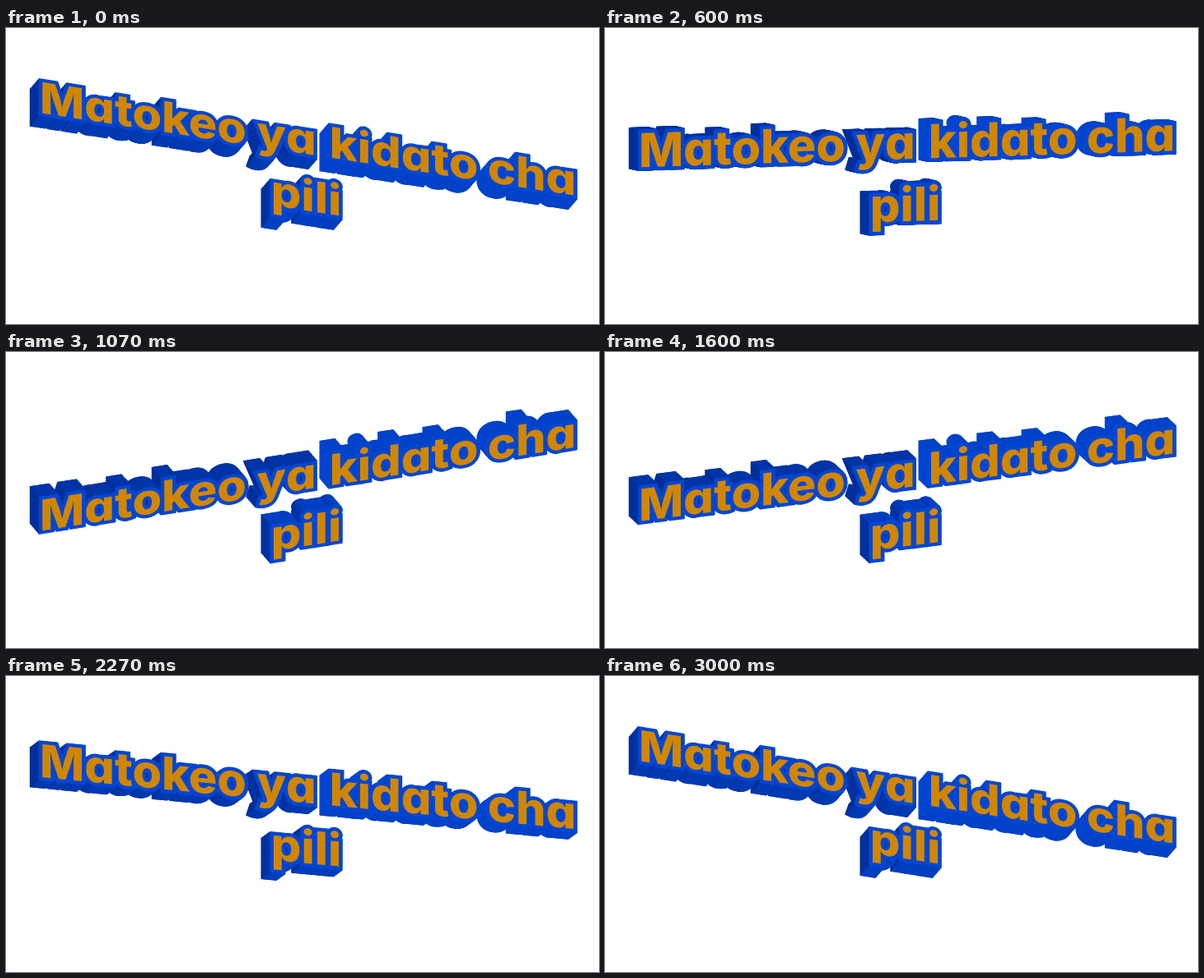
These frames come from a looping animation (720x360 px, 3070 ms). An HTML page with a canvas:

```html
<!DOCTYPE html>
<html lang="sw">
<head>
<meta charset="utf-8">
<title>Matokeo ya kidato cha pili</title>
<style>
  html, body { margin: 0; width: 100%; height: 100%; overflow: hidden; background: #fff; }
  canvas { display: block; }
</style>
</head>
<body>
<canvas id="stage" width="720" height="360" role="img" aria-label="Matokeo ya kidato cha pili"></canvas>
<script>
const ctx = document.getElementById('stage').getContext('2d');

const LOOP = 3070, STEP = 200 / 3;
const SWING = 28;            // degrees
const TURN = 0.367;          // tangent of the fixed sideways turn
const DEPTH_X = 11, FRONT = 16, LAYERS = 16;
const CENTRE = { x: 365, y: 180 };
const FACE = '#d08600', RIM = '#0046d4';
const DARK = '#002e96', LIT = '#0046d0', UNDER = '#003fbe', TOP = '#0038ae';

// centre x, baseline relative to the stage centre, wall colours (level: null follows the tilt)
const WORDS = [
  { text: 'Matokeo', x: 166.5, y: -22, left: DARK, level: null },
  { text: 'ya', x: 340.5, y: -22, left: DARK, level: null },
  { text: 'kidato', x: 483, y: -22, left: LIT, level: '#0042c6' },
  { text: 'cha', x: 638.5, y: -22, left: LIT, level: '#0042c6' },
  { text: 'pili', x: 364.5, y: 54, left: DARK, level: LIT }
];

// step, phase of the swing in degrees
const PHASES = [[0, 27], [9, 99.9], [16, 154.6], [24, 223.8], [30, 273.5], [38, 333], [45, 387]];

const rad = deg => deg * Math.PI / 180;

// The lettering has a one-storey a.
const glyphs = text => text.replace(/a/g, '\u0251');

function phaseAt(step) {
  let k = 1;
  while (k < PHASES.length - 1 && step > PHASES[k][0]) k++;
  const [s0, p0] = PHASES[k - 1], [s1, p1] = PHASES[k];
  return p0 + (p1 - p0) * (step - s0) / (s1 - s0);
}

function place(tilt, dx, dy) {
  const s = Math.sin(tilt);
  ctx.setTransform(1, TURN * s, 0, Math.cos(tilt), CENTRE.x + dx, CENTRE.y - FRONT * s + dy);
}

function slab(tilt, dx, dy, colorOf) {
  place(tilt, dx, dy);
  for (const word of WORDS) {
    const text = glyphs(word.text), x = word.x - CENTRE.x;
    ctx.fillStyle = ctx.strokeStyle = colorOf(word);
    ctx.strokeText(text, x, word.y);
    ctx.fillText(text, x, word.y);
  }
}

function draw(step) {
  const tilt = rad(SWING * Math.cos(rad(phaseAt(step))));
  const depthY = DEPTH_X * Math.sin(tilt) / TURN;
  const level = tilt > 0 ? UNDER : TOP;

  ctx.setTransform(1, 0, 0, 1, 0, 0);
  ctx.fillStyle = '#fff';
  ctx.fillRect(0, 0, 720, 360);

  ctx.font = '800 57.5px Inter, "Open Sans", sans-serif';
  ctx.textAlign = 'center';
  ctx.lineWidth = 9;
  ctx.lineJoin = 'miter';
  ctx.miterLimit = 3;

  // Left-facing walls keep their own colour; the shifted copy colours the level ones.
  for (let k = LAYERS; k > 0; k--) {
    const u = k / LAYERS;
    slab(tilt, -DEPTH_X * u, depthY * u, word => word.left);
    slab(tilt, -DEPTH_X * u + 0.8, depthY * u, word => word.level || level);
  }
  slab(tilt, 0, 0, () => RIM);

  place(tilt, 0, 0);
  ctx.fillStyle = FACE;
  for (const word of WORDS) ctx.fillText(glyphs(word.text), word.x - CENTRE.x, word.y);
}

const start = performance.now();
let shown = -1;

function tick() {
  const t = (performance.now() - start) % LOOP;
  const step = Math.min(45, Math.floor((Math.floor(t / 10) * 10 + 5) / STEP));
  if (step !== shown) draw(shown = step);
  requestAnimationFrame(tick);
}
tick();
</script>
</body>
</html>
```
